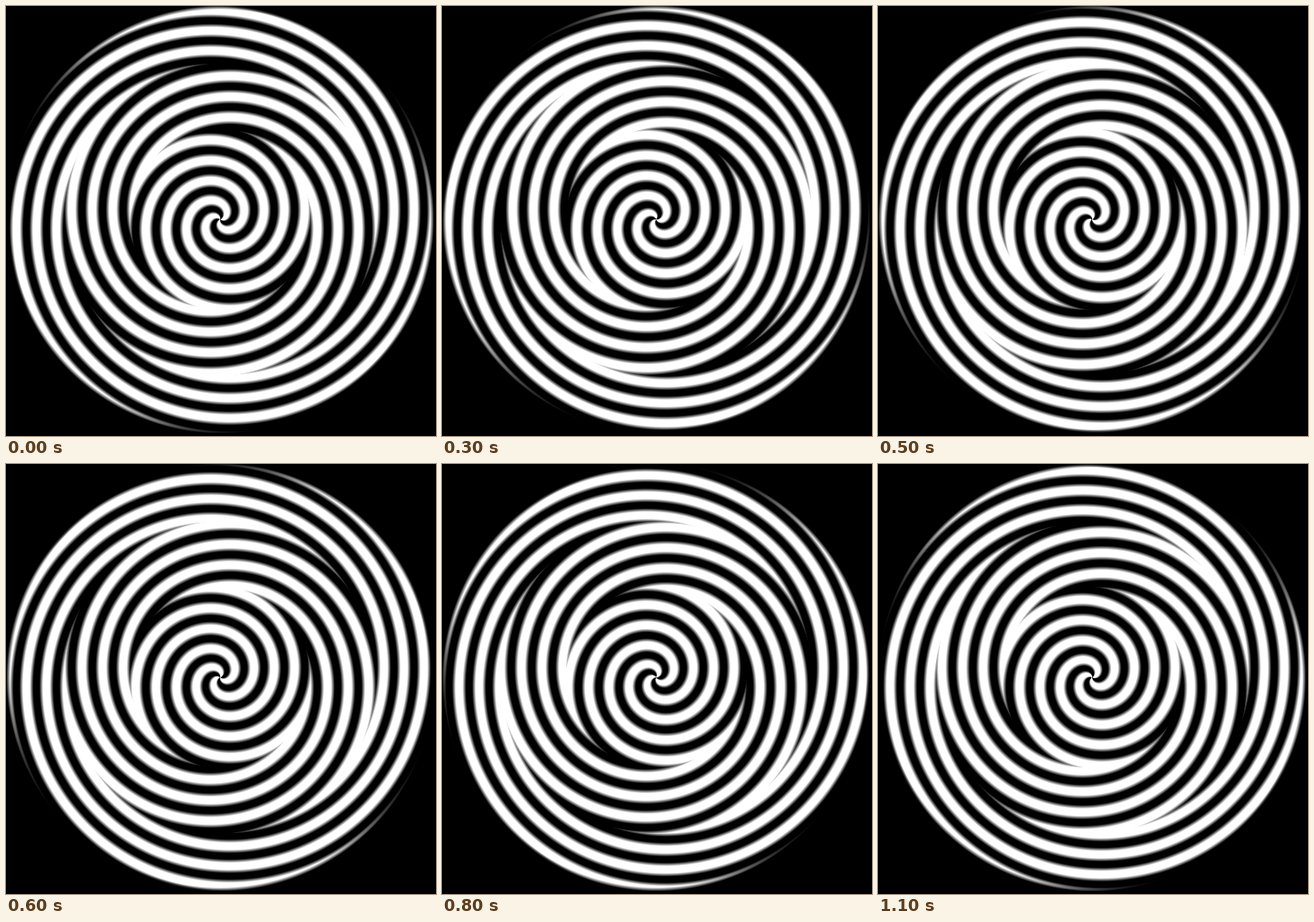
An HTML page with a canvas for the animation above (1.2 s loop, 550 by 550 pixels).

```html
<!DOCTYPE html>
<html lang="en">
<head>
<meta charset="utf-8">
<title>Alternating spirals</title>
<style>
  html, body { margin: 0; width: 100%; height: 100%; overflow: hidden; background: #000; }
  canvas { display: block; }
</style>
</head>
<body>
<canvas id="stage" width="550" height="550"></canvas>
<script>
const SIZE = 550, CX = 274, CY = 273;
const LOOP = 1200, STEPS = 12, ARMS = 3;
const INNER = 115.5, MIDDLE = 199.5, RIM = 273.5, RIM_SOFT = 5;
const PITCH = 26.4, OUTER_PITCH = 25.6, START = 0.123;

const ctx = document.getElementById('stage').getContext('2d');
const image = ctx.createImageData(SIZE, SIZE);
const pixels = new Uint32Array(image.data.buffer);
const phase = new Float32Array(SIZE * SIZE);
const mask = new Float32Array(SIZE * SIZE);
const clamp = v => Math.max(0, Math.min(1, v));

// Radial phase in turns: it reverses direction at each ring boundary.
function radialPhase(r) {
  if (r > MIDDLE) return START + (r - MIDDLE) / OUTER_PITCH;
  const peak = START + (MIDDLE - INNER) / PITCH;
  return peak - Math.abs(r - INNER) / PITCH;
}

for (let y = 0, i = 0; y < SIZE; y++) {
  for (let x = 0; x < SIZE; x++, i++) {
    const dx = x + 0.5 - CX, dy = y + 0.5 - CY;
    const r = Math.hypot(dx, dy);
    phase[i] = 2 * Math.PI * radialPhase(r) + ARMS * Math.atan2(dy, dx);
    mask[i] = clamp((RIM - r) / RIM_SOFT);
  }
}

function draw(step) {
  const turn = 2 * Math.PI * step / STEPS;
  for (let i = 0; i < pixels.length; i++) {
    const light = mask[i] && mask[i] * clamp(0.55 + 0.9 * Math.cos(phase[i] - turn));
    const v = Math.round(255 * light);
    pixels[i] = (0xff000000 | v << 16 | v << 8 | v) >>> 0;
  }
  ctx.putImageData(image, 0, 0);
}

const begin = performance.now();
let shown = 0;

function tick() {
  const time = (performance.now() - begin) % LOOP;
  const step = Math.floor(time * STEPS / LOOP);
  if (step !== shown) draw(shown = step);
  requestAnimationFrame(tick);
}

draw(0);
requestAnimationFrame(tick);
</script>
</body>
</html>
```
